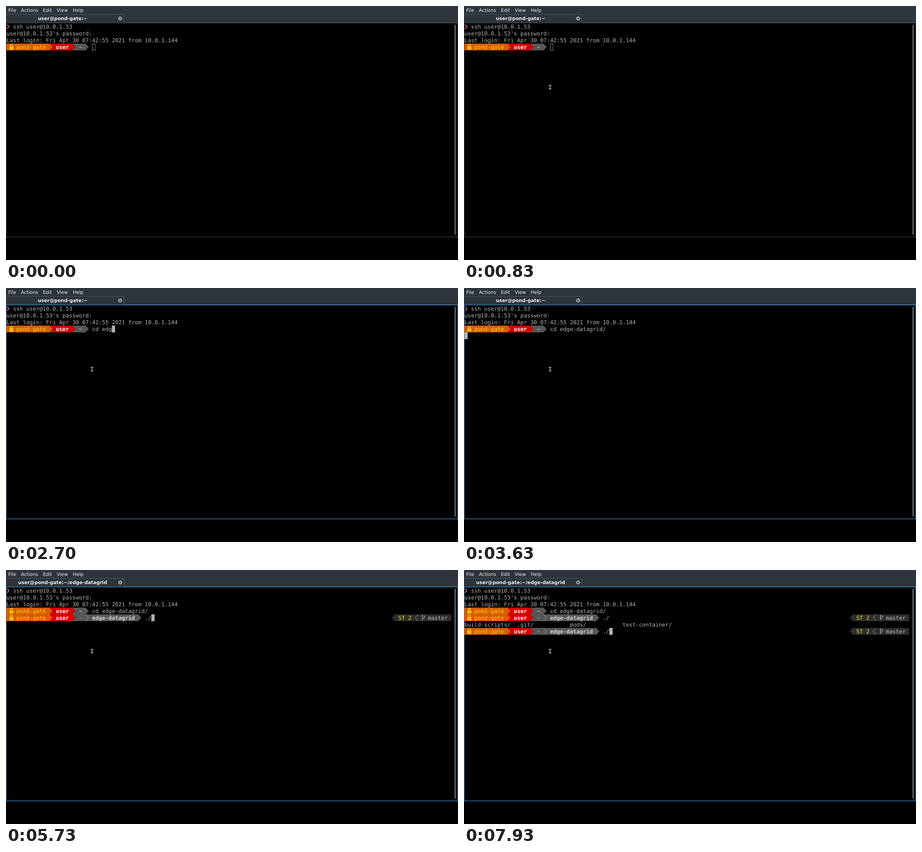
An HTML page that plays this animation: 998 by 561 pixels, repeating every 8000 ms.

```html
<!DOCTYPE html>
<html lang="en">
<head>
<meta charset="utf-8">
<title>Terminal session</title>
<style>
  html, body { margin: 0; width: 100%; height: 100%; overflow: hidden; background: #000; }
  svg { display: block; width: 998px; height: 561px; }
  text { white-space: pre; text-rendering: geometricPrecision; }
  .ui { font: 10.4px "DejaVu Sans", sans-serif; fill: #f0f1f1; }
  .term { font: 12.08px "DejaVu Sans Mono", monospace; fill: #b4b2ab; }
  .bold { font-weight: bold; }
</style>
</head>
<body>
<svg id="stage" viewBox="0 0 998 561"></svg>
<script>
const DURATION = 8000;
const LEFT = 1, TOP = 38, CELL = 7.27, LINE = 15;
const stage = document.getElementById('stage');

const colX = col => LEFT + col * CELL;
const rowY = row => TOP + row * LINE;

const rect = (x, y, w, h, fill, extra = '') =>
  `<rect x="${x}" y="${y}" width="${w}" height="${h}" fill="${fill}" ${extra}/>`;
const line = (d, color, width = 1) =>
  `<path d="${d}" fill="none" stroke="${color}" stroke-width="${width}"/>`;
const term = (col, row, text, fill = '#b4b2ab', bold = '') =>
  `<text class="term ${bold}" x="${colX(col)}" y="${rowY(row) + 12}" style="fill:${fill}">${text}</text>`;
const ui = (x, y, text, extra = '') => `<text class="ui" x="${x}" y="${y}" ${extra}>${text}</text>`;

// Block from one column to another whose right end is an arrow one cell long.
function segment(from, to, row, fill) {
  const y = rowY(row);
  return `<path d="M${colX(from)} ${y}H${colX(to)}l${CELL} ${LINE / 2}l${-CELL} ${LINE / 2}H${colX(from)}z" fill="${fill}"/>`;
}

function chevron(col, row, dir) {
  const x = colX(col + (dir < 0 ? 1 : 0));
  return line(`M${x} ${rowY(row) + .5}l${dir * (CELL - .7)} 7l${-dir * (CELL - .7)} 7`, '#aaa');
}

function lock(row) {
  const y = rowY(row);
  return line(`M9.3 ${y + 7}v-2.2a2.6 2.6 0 0 1 5.2 0v2.2`, '#ffd31a', 1.4) +
    rect(7.8, y + 6.3, 8.2, 6.9, '#ffd31a', 'rx=".8"') +
    rect(11.2, y + 8.3, 1.4, 2.8, '#b86a00');
}

function prompt(row, dir) {
  const path = dir
    ? term(22, row, '~', '#aaa') + chevron(24, row, 1) + term(26, row, dir, '#d6d6d6', 'bold')
    : term(22, row, '~', '#dadada');
  return segment(20, dir ? 40 : 24, row, '#565656') +
    segment(13, 20, row, '#d50000') +
    segment(0, 13, row, '#d65d00') +
    lock(row) + term(3, row, 'pond-gate', '#ffd31a') +
    term(15, row, 'user', '#fff', 'bold') + path;
}

function gitStatus(row) {
  const y = rowY(row), x = colX(117);
  return `<path d="M${x} ${y + 7.5}l${CELL} -7.5H983v15H${x + CELL}z" fill="#2e2e2e"/>` +
    term(119, row, 'ST 2', '#ffdc2b') + chevron(124, row, -1) +
    line(`M919.5 ${y + 1.5}v12M919.5 ${y + 10.5}l4.3 -3.2v-4.3`, '#b8b8b8', 1.1) +
    line(`M918 ${y + 3.5}l1.5 -2l1.5 2M922.3 ${y + 5}l1.5 -2l1.5 2`, '#b8b8b8', .9) +
    term(128, row, 'master', '#bcbcbc');
}

const listing = ['build-scripts/', '.git/', 'pods/', 'test-container/'];

stage.innerHTML =
  rect(0, 0, 998, 561, '#000') +
  rect(0, 0, 998, 37, '#2e343b') +
  line('M0 18.5H260.5V36.5H998', '#50565c') +
  [[5, 'File'], [33, 'Actions'], [81.5, 'Edit'], [112, 'View'], [147.5, 'Help']]
    .map(([x, label]) => ui(x, 13, label)).join('') +
  ui(125, 31.3, '', 'id="title" text-anchor="middle" font-weight="bold" style="font-weight:bold"') +
  '<circle cx="252" cy="27.5" r="4.3" fill="#a9adb0"/>' +
  line('M250.2 25.7l3.6 3.6m0 -3.6l-3.6 3.6', '#30353b', 1.1) +
  rect(.5, 37.5, 997, 472.5, 'none', 'id="frame" stroke-width="1.3"') +
  rect(990, 41, 3.4, 464, '#5b5a56', 'rx="1.5"') +
  line('M2.8 41.3l3.6 4.4l-3.6 4.4', '#ee6a9e', 1.7) +
  term(2, 0, 'ssh user@10.0.1.53') +
  term(0, 1, "user@10.0.1.53's password:") +
  term(0, 2, 'Last login: Fri Apr 30 07:42:55 2021 from 10.0.1.144') +
  prompt(3) +
  `<g id="second">${prompt(4, 'edge-datagrid')}${gitStatus(4)}</g>` +
  `<g id="third">${listing.map((name, i) => term(i * 16, 5, name)).join('')}` +
  `${prompt(6, 'edge-datagrid')}${gitStatus(6)}${term(42, 6, './')}</g>` +
  '<text id="cd" class="term"></text><text id="run" class="term"></text>' +
  rect(0, 0, CELL, LINE, 'none', 'id="caret"') +
  `<g id="pointer">${line('M-2.8 -3.8H2.8M0 -3.8V4M-2.8 4H2.8', '#000', 3)}` +
  `${line('M-2.8 -3.8H2.8M0 -3.8V4M-2.8 4H2.8', '#e4e4e4', 1.3)}</g>`;

const part = id => document.getElementById(id);
const [title, frame, second, third, cd, run, caret, pointer] =
  ['title', 'frame', 'second', 'third', 'cd', 'run', 'caret', 'pointer'].map(part);

for (const [el, col, row] of [[cd, 26, 3], [run, 42, 4]]) {
  el.setAttribute('x', colX(col));
  el.setAttribute('y', rowY(row) + 12);
}

const FOCUS = 1150, ENTER = 3260, PROMPT = 3900, LIST = 7200;
const cdKeys = [[0, ''], [1420, 'c'], [1540, 'cd'], [1680, 'cd '], [2380, 'cd e'],
  [2560, 'cd ed'], [2680, 'cd edg'], [2800, 'cd edge'], [2960, 'cd edge-datagrid/']];
const runKeys = [[0, ''], [5380, '.'], [5560, './']];
const typed = (keys, t) => keys.filter(([at]) => at <= t).pop()[1];

function caretCell(t, cdText, runText) {
  if (t >= LIST) return [44, 6];
  if (t >= PROMPT) return [42 + runText.length, 4];
  if (t >= ENTER) return [0, 4];
  return [26 + cdText.length, 3];
}

function draw(t) {
  const focused = t >= FOCUS;
  const cdText = typed(cdKeys, t), runText = typed(runKeys, t);
  cd.textContent = cdText;
  run.textContent = runText;
  title.textContent = 'user@pond-gate:~' + (t >= PROMPT ? '/edge-datagrid' : '');
  second.style.display = t >= PROMPT ? '' : 'none';
  third.style.display = t >= LIST ? '' : 'none';
  frame.setAttribute('stroke', focused ? '#3589c9' : '#394045');

  const [col, row] = caretCell(t, cdText, runText);
  const inset = focused ? 0 : .5;
  caret.setAttribute('x', colX(col) + inset);
  caret.setAttribute('y', rowY(row) + inset);
  caret.setAttribute('width', CELL - 2 * inset);
  caret.setAttribute('height', LINE - 2 * inset);
  caret.setAttribute('fill', focused ? '#b4b2ab' : 'none');
  caret.setAttribute('stroke', focused ? 'none' : '#8f8e89');

  const glide = Math.min(1, Math.max(0, (t - 300) / 400));
  const left = (1 - glide) ** 2;
  pointer.style.display = glide > 0 ? '' : 'none';
  pointer.setAttribute('transform', `translate(${190 + 60 * left} ${179.2 - 179 * left})`);
}

const start = performance.now();
function tick() {
  draw((performance.now() - start) % DURATION);
  requestAnimationFrame(tick);
}
tick();
</script>
</body>
</html>
```
